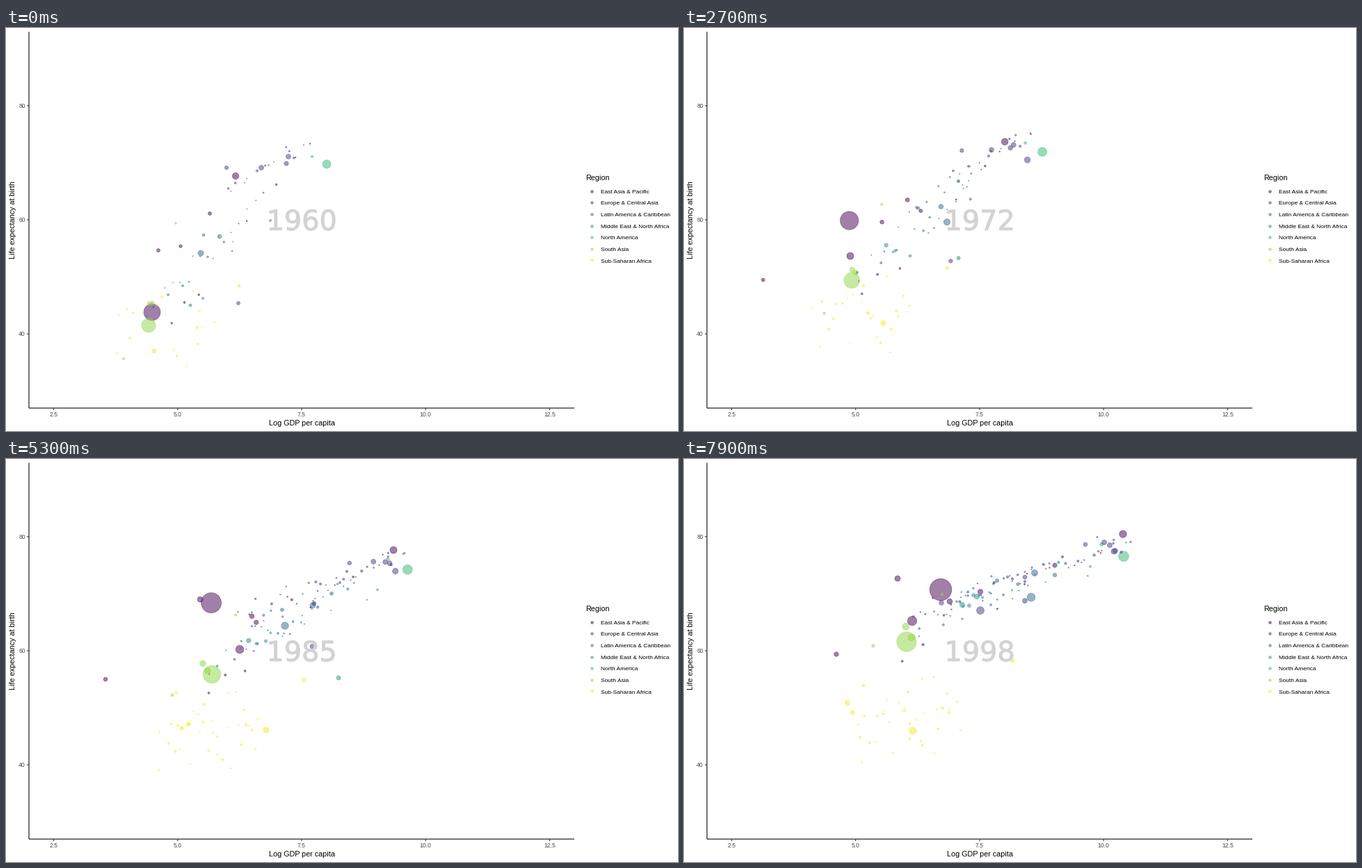
Write a matplotlib script that moves like this. It is 966 px wide and 580 px high and loops after 8000 ms.

```python
import numpy as np
import matplotlib.pyplot as plt
from matplotlib.animation import FuncAnimation
from matplotlib.colors import to_rgba
from matplotlib.patheffects import Normal, Stroke

W, H, DPI = 966, 580, 100
PX = 72 / DPI  # points per pixel
INTERVAL, FRAMES = 100, 80

# shared clock: year shown and share of the income growth reached
KEYS = [0, 1700, 3500, 4500, 5300, 6400, 7900]
YEARS = [1960, 1967, 1976, 1981, 1985, 1990, 1998]
GROWTH = [0, 0.15, 0.45, 0.66, 0.68, 0.88, 1]

# the picture holds between these moments
STEPS = np.array([0, 100, 200, 500, 800, *range(1100, 1701, 100), 1900, 2100,
                  *range(2300, 2501, 100), *range(2700, 3501, 200),
                  *range(3700, 4101, 100), *range(4300, 4701, 100),
                  4900, 5100, 5300, *range(5500, 7901, 100)])

REGIONS = {
    "E": ("East Asia & Pacific", "#440154"),
    "C": ("Europe & Central Asia", "#443A83"),
    "L": ("Latin America & Caribbean", "#31688E"),
    "M": ("Middle East & North Africa", "#21908C"),
    "N": ("North America", "#35B779"),
    "S": ("South Asia", "#8FD744"),
    "A": ("Sub-Saharan Africa", "#FDE725"),
}

clock = np.arange(FRAMES) * INTERVAL
held = STEPS[np.searchsorted(STEPS, clock, side="right") - 1]
year_now = np.interp(held, KEYS, YEARS)
growth = np.interp(held, KEYS, GROWTH)
aging = (year_now - 1960) / 38
rng = np.random.default_rng(7)
dots = []


def add(region, r0, r1, x, y, born):
    r = r0 + (r1 - r0) * aging
    dots.append((x, y, np.where(held >= born, r, 0), to_rgba(REGIONS[region][1], 0.5)))


def glide(region, r0, r1, start, end, born=0, wobble=0):
    """Income follows the shared growth, life expectancy the years."""
    sway = wobble * np.sin(held / 1000 + start[0])
    add(region, r0, r1, start[0] + (end[0] - start[0]) * growth + sway,
        start[1] + (end[1] - start[1]) * aging, born)


def keyed(region, r0, r1, *pts, times=(0, 3500, 5300, 7900), born=0):
    xs, ys = zip(*pts)
    add(region, r0, r1, np.interp(held, times, xs), np.interp(held, times, ys), born)


def swarm(region, n, spread, first, last, late=None):
    """Small dots along a line (x0, y0, x1, y1) that drifts from first to last."""
    first, last = np.reshape(first, (2, 2)), np.reshape(last, (2, 2))
    for i in range(n):
        u = (i + rng.random()) / n
        shift = np.array([0, rng.normal(0, spread)])
        r = 0.9 + 1.1 * rng.random() ** 1.5
        born = rng.uniform(*late) if late else 0
        glide(region, r, r + 0.2, first[0] + (first[1] - first[0]) * u + shift,
              last[0] + (last[1] - last[0]) * u + shift, born, wobble=4)


# bubbles with a course of their own
keyed("E", 12.3, 16.2, (210, 409), (216, 326), (255, 238), (267, 217), (295, 207),
      (301, 201), (369, 188), times=KEYS)
keyed("S", 10.4, 14.5, (205, 428), (252, 344), (296, 310), (320, 263))
keyed("A", 3.4, 5.4, (213, 465), (218, 442), (341, 411), (438, 394), (374, 390),
      (342, 392), (329, 391), times=KEYS)
keyed("E", 5, 5.6, (330, 213), (500, 149), (557, 131), (631, 108))
keyed("L", 4.4, 6.2, (280, 324), (407, 266), (401, 240), (499, 199))
keyed("M", 2.4, 4, (265, 399), (433, 311), (478, 315), (421, 198))
keyed("E", 4.7, 7, (174, 352), (291, 309), (336, 274), (328, 233),
      times=(1700, 3500, 5300, 7900), born=1100)
keyed("E", 2.5, 3.6, (72, 382), (147, 347), (143, 317), (219, 281),
      times=(1700, 3500, 5300, 7900), born=1100)
keyed("E", 4, 4.4, (279, 202), (215, 189), (307, 172), times=(5300, 6400, 7900), born=5100)
keyed("C", 5.8, 5.8, (472, 203), (426, 218), times=(6400, 7900), born=5700)
keyed("C", 3.7, 3.7, (411, 194), (370, 207), times=(6400, 7900), born=5700)
keyed("C", 3.3, 3.3, (422, 187), (490, 170), times=(6400, 7900), born=6200)

# bubbles that follow the common drift
glide("N", 6.4, 7.7, (461, 196), (632, 140))
glide("N", 2.1, 2.8, (440, 185), (600, 123))
glide("C", 3.8, 3.9, (406, 185), (620, 132))
glide("C", 3.5, 3.9, (403, 195), (612, 124))
glide("C", 3.8, 3.9, (367, 201), (604, 120))
glide("C", 3, 3.3, (317, 201), (577, 123))
glide("C", 4.8, 4.4, (436, 216), (618, 133), born=2400)
glide("C", 2.8, 3.9, (334, 396), (490, 204))
glide("E", 2.8, 4, (219, 320), (426, 191))
glide("E", 2.8, 4.2, (293, 267), (382, 205))
glide("E", 2.6, 3.5, (251, 314), (533, 153))
glide("L", 3.2, 4.9, (307, 300), (504, 164))
glide("L", 2.3, 3.1, (330, 245), (533, 167), born=1100)
glide("L", 2.3, 3, (284, 298), (450, 175))
glide("L", 1.8, 2.5, (380, 277), (480, 180))
glide("M", 2.7, 4, (240, 360), (400, 210), born=1100)
glide("M", 2, 2.8, (283, 389), (416, 196))
glide("M", 2, 2.8, (254, 371), (410, 211))
glide("S", 3.2, 5.4, (206, 397), (319, 241))
glide("S", 3.4, 5.4, (210, 396), (327, 257))
glide("S", 1.9, 2.6, (169, 476), (272, 269))
glide("S", 1.8, 2.2, (244, 281), (371, 195))
glide("A", 2.3, 3.2, (335, 371), (472, 290))
glide("A", 2.2, 3.4, (275, 431), (242, 365))
glide("A", 2.6, 3.9, (320, 440), (235, 351), born=4300)

# the many tiny ones
swarm("E", 7, 10, (215, 445, 430, 185), (285, 305, 615, 115))
swarm("E", 5, 8, (290, 300, 380, 200), (380, 230, 610, 125), late=(1100, 6000))
swarm("C", 14, 6, (308, 235, 442, 165), (545, 152, 645, 120))
swarm("C", 22, 7, (320, 225, 440, 185), (325, 228, 520, 155), late=(4300, 6400))
swarm("L", 18, 14, (200, 420, 370, 235), (330, 258, 530, 150))
swarm("L", 12, 10, (270, 330, 390, 230), (370, 220, 500, 165), late=(1100, 5000))
swarm("M", 8, 12, (240, 385, 430, 240), (380, 220, 610, 150), late=(200, 5500))
swarm("A", 20, 33, (155, 415, 300, 425), (245, 385, 395, 350))
swarm("A", 14, 33, (190, 410, 290, 425), (250, 385, 400, 345), late=(800, 5000))

X, Y, R, COLORS = (np.array(part) for part in zip(*dots))


def area(r):
    """Scatter size in points squared; the thin rim adds the rest of the radius."""
    return np.where(r > 0, (2 * np.maximum(r - 0.35, 0.3) * PX) ** 2, 0)


fig = plt.figure(figsize=(W / DPI, H / DPI), dpi=DPI, facecolor="white")
ax = fig.add_axes([0, 0, 1, 1])
ax.set_xlim(0, W)
ax.set_ylim(H, 0)
ax.axis("off")


def label(x, y, s, px, color="black", family="Liberation Sans", **kw):
    return ax.text(x, y, s, fontsize=px * PX, color=color, family=family,
                   va="baseline", **kw)


def line(xs, ys, color="black"):
    ax.plot(xs, ys, color=color, lw=1.07 * PX, solid_capstyle="butt", snap=False)


line([33, 33], [5.5, 547])
line([33, 817], [547, 547])
for v in (2.5, 5, 7.5, 10, 12.5):
    x = 68.5 + (v - 2.5) * 71.3
    line([x, x], [547, 550], "#333333")
    label(x, 559, f"{v:.1f}", 8.6, "#4D4D4D", ha="center")
for v in (40, 60, 80):
    y = 276 - (v - 60) * 8.21
    line([30, 33], [y, y], "#333333")
    label(28, y + 3.2, str(v), 8.6, "#4D4D4D", ha="right")
label(425, 572.5, "Log GDP per capita", 10.75, ha="center")
label(13, 276, "Life expectancy at birth", 10.75, ha="center", rotation=90,
      rotation_mode="anchor")

label(833, 219, "Region", 10.75)
for i, (name, color) in enumerate(REGIONS.values()):
    y = 234.7 + 16.6 * i
    ax.scatter([841.5], [y], s=area(2.2), color=[to_rgba(color, 0.5)], linewidths=0.7 * PX)
    label(855, y + 3.2, name, 8.4)

bubbles = ax.scatter(X[:, 0], Y[:, 0], s=area(R[:, 0]), facecolors=COLORS,
                     edgecolors=COLORS, zorder=3)
year = label(425, 290.8, "1960", 39.8, "#D3D3D3", "DejaVu Sans", ha="center", zorder=4)
year.set_path_effects([Stroke(linewidth=PX, foreground="#D3D3D3"), Normal()])


def update(i):
    bubbles.set_offsets(np.column_stack([X[:, i], Y[:, i]]))
    bubbles.set_sizes(area(R[:, i]))
    bubbles.set_linewidths(np.where(R[:, i] > 0, 0.7 * PX, 0))
    year.set_text(str(int(year_now[i] + 0.5)))
    return bubbles, year


anim = FuncAnimation(fig, update, frames=FRAMES, interval=INTERVAL, repeat=True,
                     repeat_delay=0, blit=False)
plt.show()
```
